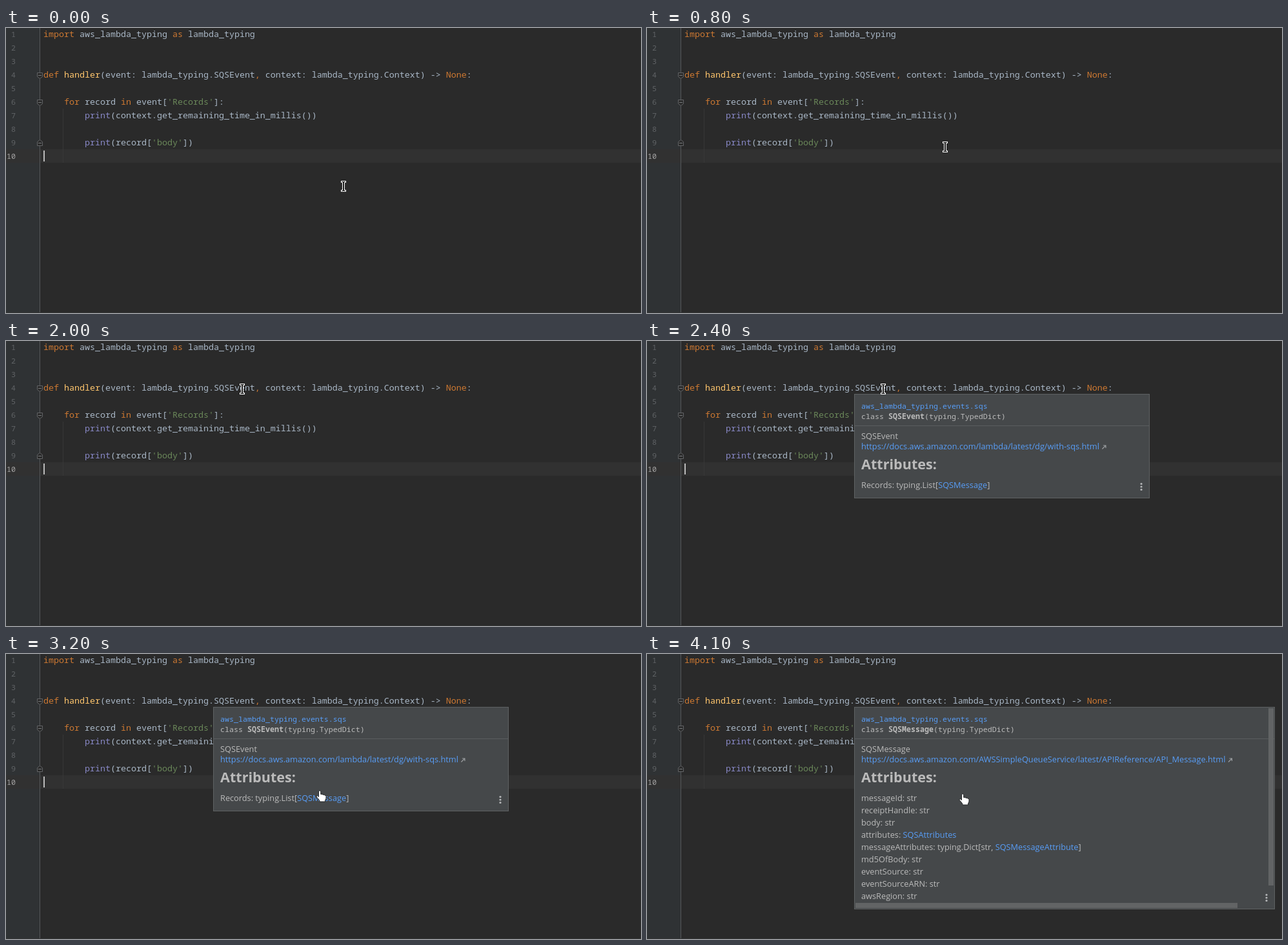
An HTML page with a canvas for the animation above (5800 ms loop, 984 by 442 pixels).

```html
<!DOCTYPE html>
<html lang="en">
<head>
<meta charset="utf-8">
<title>Quick documentation</title>
<style>
html, body { margin: 0; width: 100%; height: 100%; overflow: hidden; background: #2a2a2a; }
canvas { display: block; }
</style>
</head>
<body>
<canvas id="stage" width="984" height="442"></canvas>
<script>
const ctx = document.getElementById('stage').getContext('2d');
const LOOP = 5800;
const MONO = '"Noto Sans Mono", monospace';
const SANS = '"Open Sans", sans-serif';
const CODE = `13.333px ${MONO}`;
const SMALL = `11.667px ${MONO}`;
const SMALL_BOLD = `bold ${SMALL}`;
const BODY = `12.75px ${SANS}`;
const HEADING = `bold 21.6px ${SANS}`;

const PLAIN = '#a9b7c6', KEY = '#cc7832', FUNC = '#ffc66d', STR = '#6a8759', BUILTIN = '#8888c6';
const DOC = '#bbbbbb', LINK = '#589df6';

// Each line is a list of [text, colour] runs.
const code = [
  [['import', KEY], [' aws_lambda_typing '], ['as', KEY], [' lambda_typing']],
  [],
  [],
  [['def ', KEY], ['handler', FUNC], ['(event: lambda_typing.SQSEvent'], [',', KEY],
   [' context: lambda_typing.Context) -> '], ['None', KEY], [':']],
  [],
  [['    for', KEY], [' record '], ['in', KEY], [' event['], ["'Records'", STR], [']:']],
  [['        print', BUILTIN], ['(context.get_remaining_time_in_millis())']],
  [],
  [['        print', BUILTIN], ['(record['], ["'body'", STR], ['])']],
  []
];

const eventDoc = {
  w: 458, h: 162, name: 'SQSEvent',
  url: 'https://docs.aws.amazon.com/lambda/latest/dg/with-sqs.html',
  rows: [[['Records: typing.List['], ['SQSMessage', LINK], [']']]]
};

const messageDoc = {
  w: 652, h: 314, name: 'SQSMessage', scroll: true,
  url: 'https://docs.aws.amazon.com/AWSSimpleQueueService/latest/APIReference/API_Message.html',
  rows: [
    [['messageId: str']],
    [['receiptHandle: str']],
    [['body: str']],
    [['attributes: '], ['SQSAttributes', LINK]],
    [['messageAttributes: typing.Dict[str, '], ['SQSMessageAttribute', LINK], [']']],
    [['md5OfBody: str']],
    [['eventSource: str']],
    [['eventSourceARN: str']],
    [['awsRegion: str']]
  ]
};

// Pointer stops: [time, x, y, shape]
const pointer = [
  [0, 523, 245, iBeam], [800, 462, 184, iBeam], [900, 412, 124, iBeam],
  [1000, 385, 93, iBeam], [1100, 370, 78, iBeam], [1200, 366, 74, iBeam],
  [2700, 373, 84, iBeam], [2800, 390, 106, hand], [2900, 411, 130, hand],
  [3000, 438, 163, hand], [3100, 468, 192, hand], [3200, 486, 212, hand],
  [3300, 488, 215, hand], [3400, 489, 217, hand]
];

const caretTimes = [[0, 500], [1000, 1500], [2000, 2700], [3100, 3600]];

const between = (t, a, b) => t >= a && t < b;

function rect(color, x, y, w, h) {
  ctx.fillStyle = color;
  ctx.fillRect(x, y, w, h);
}

function runs(list, x, y, font, base, underlined) {
  ctx.font = font;
  for (const [text, color = base] of list) {
    const width = ctx.measureText(text).width;
    ctx.fillStyle = color;
    ctx.fillText(text, x, y);
    if (underlined && color === LINK) ctx.fillRect(x, y + 1, width, 1);
    x += width;
  }
  return x;
}

function polygon(points, fill, stroke) {
  ctx.beginPath();
  points.forEach(([x, y]) => ctx.lineTo(x, y));
  ctx.closePath();
  ctx.fillStyle = fill;
  ctx.fill();
  ctx.strokeStyle = stroke;
  ctx.lineWidth = 1;
  ctx.stroke();
}

function foldMark(y, dir) {
  polygon([[48.5, y - 4 * dir], [56.5, y - 4 * dir], [56.5, y + 2 * dir],
           [52.5, y + 5 * dir], [48.5, y + 2 * dir]], '#2a2a2a', '#626466');
  rect('#777a7c', 50, Math.floor(y), 5, 1);
}

function editor(t) {
  rect('#2a2a2a', 0, 0, 984, 442);
  rect('#2f3234', 0, 0, 52, 442);
  rect('#313131', 0, 188, 984, 21);
  rect('#555759', 52, 0, 1, 442);
  rect('#323334', 0, 441, 984, 1);
  rect('#373737', 88, 125, 1, 84);

  code.forEach((line, i) => {
    const y = 14 + 21 * i;
    ctx.textAlign = 'right';
    runs([[String(i + 1)]], 15, y, SMALL, i === 9 ? '#a4a3a3' : '#606366');
    ctx.textAlign = 'left';
    runs(line, 58, y, CODE, PLAIN);
  });

  foldMark(73.5, 1);
  foldMark(115.5, 1);
  foldMark(178.5, -1);
  if (caretTimes.some(([a, b]) => between(t, a, b))) rect('#bbbbbb', 58, 190, 2, 17);
}

function externalArrow(x, y) {
  ctx.strokeStyle = '#9a9da0';
  ctx.lineWidth = 1.2;
  ctx.beginPath();
  ctx.moveTo(x, y);
  ctx.lineTo(x + 5.5, y - 5.5);
  ctx.moveTo(x + 1.5, y - 5.5);
  ctx.lineTo(x + 5.5, y - 5.5);
  ctx.lineTo(x + 5.5, y - 1.5);
  ctx.stroke();
}

function popup({ w, h, name, url, rows, scroll }, urlHover, rowHover) {
  const left = 321, top = 82, x = 332;
  rect('#5e6162', left, top, w, h);
  rect('#45484a', left + 1, top + 1, w - 2, h - 2);
  rect('#5a5d5f', left + 1, 131, w - 2, 1);

  runs([['aws_lambda_typing.events.sqs']], x, 105, SMALL, LINK);
  let end = runs([['class ']], x, 121, SMALL, DOC);
  end = runs([[name]], end, 121, SMALL_BOLD, DOC);
  runs([['(typing.TypedDict)']], end, 121, SMALL, DOC);

  runs([[name]], x, 152, BODY, DOC);
  end = runs([[url, LINK]], x, 168, BODY, DOC, urlHover);
  externalArrow(end + 4.5, 167.5);
  runs([['Attributes:']], x, 199, HEADING, DOC);
  rows.forEach((row, i) => runs(row, x, 228 + 19 * i, BODY, DOC, rowHover));

  if (scroll) {
    rect('#626465', 963, 84, 8, 275);
    rect('#626465', 323, 386, 592, 8);
  }
  ctx.fillStyle = '#b4b6b8';
  for (let i = -1; i <= 1; i++) {
    ctx.beginPath();
    ctx.arc(left + w - 13, top + h - 18 + 4.5 * i, 1.6, 0, 2 * Math.PI);
    ctx.fill();
  }
}

function iBeam(x, y) {
  rect('#ffffff', x - 4, y - 8, 8, 3);
  rect('#ffffff', x - 4, y + 6, 8, 3);
  rect('#ffffff', x - 2, y - 8, 4, 17);
  rect('#181818', x - 3, y - 7, 6, 1);
  rect('#181818', x - 3, y + 7, 6, 1);
  rect('#181818', x - 1, y - 7, 2, 15);
}

// (x, y) is the fingertip.
function hand(x, y) {
  ctx.save();
  ctx.translate(x, y);
  ctx.lineJoin = 'round';
  polygon([[-1.5, 1], [-0.5, 0], [0.8, 0], [1.8, 1], [1.8, 5.5], [4, 5.3], [5, 6.2],
           [7, 6.2], [8, 7.2], [9.4, 7.4], [10, 8.5], [10, 12], [8.6, 15], [8.6, 17],
           [0, 17], [-0.3, 15], [-2.6, 12], [-4.8, 9.6], [-4.6, 8], [-3.2, 7.8], [-1.5, 9.5]],
          '#ffffff', '#222426');
  ctx.restore();
}

function draw(t) {
  editor(t);
  if (t >= 4100) popup(messageDoc);
  else if (t >= 2400) popup(eventDoc, between(t, 2900, 3100), t >= 3300);
  const [, x, y, shape] = pointer.filter(stop => t >= stop[0]).pop();
  shape(x, y);
}

const start = performance.now();
function tick() {
  draw((performance.now() - start) % LOOP);
  requestAnimationFrame(tick);
}
tick();
</script>
</body>
</html>
```
